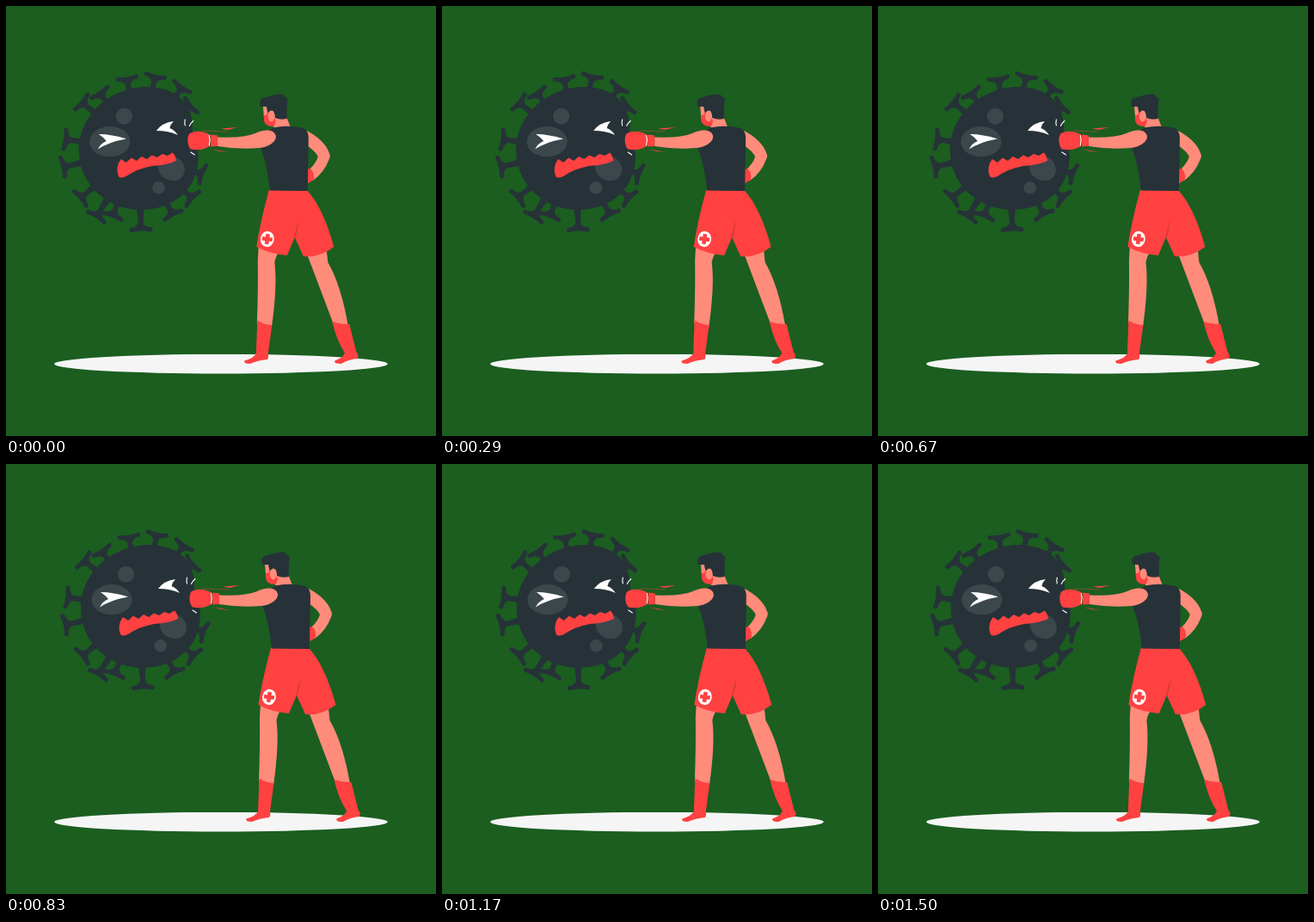
Recreate the animation shown at these times as an HTML page. Size 500 by 500 pixels, loop 1.54 s.

```html
<!DOCTYPE html>
<html lang="en">
<head>
<meta charset="utf-8">
<title>Knockout punch</title>
<style>
  html, body { margin: 0; width: 100%; height: 100%; overflow: hidden; background: #1b5e20; }
  svg { display: block; width: 100%; height: 100%; }
  .dark { fill: #263238; }
  .red { fill: #ff4141; }
  .skin { fill: #ff8b7b; }
  .white { fill: #fff; }
  .spot { fill: #fff; opacity: .1; }
  .line { fill: none; stroke: #fff; stroke-width: 1.1; stroke-linecap: round; }
</style>
</head>
<body>
<svg viewBox="0 0 500 500">
  <defs>
    <path id="spike" d="M-12-2Q0 1 12-2Q15 1 12 3Q4 4 2.800 9L4 24H-4L-2.800 9Q-4 4-12 3Q-15 1-12-2Z"/>
  </defs>
  <ellipse cx="250" cy="416.2" rx="193.9" ry="11.3" fill="#f5f5f5"/>
  <g id="scene">
    <!-- virus -->
    <g id="spikes" class="dark"></g>
    <path class="dark" d="M85 168C85 126 122 94 165 94C204 95 219 119 217 146C233 173 225 237 155 237C116 236 85 206 85 168Z"/>
    <g class="spot">
      <ellipse cx="121" cy="157.700" rx="23.500" ry="17.600"/>
      <circle cx="137.500" cy="128.300" r="9.500"/>
      <ellipse cx="192.500" cy="188.700" rx="16" ry="14" transform="rotate(30 192.500 188.700)"/>
      <circle cx="177.700" cy="211.300" r="7.300"/>
    </g>
    <path class="white" d="M108 149Q123 149 140 154.500Q120 158 107 166.500Q110 160 117 157Q114 153 108 149Z"/>
    <path class="white" d="M175 145Q182 135.500 195 134Q191 138 190.500 142Q196 144 200 150Q189 145 175 145Z"/>
    <path id="mouth" class="red"/>

    <!-- impact and speed lines -->
    <path class="line" d="M208.500 132Q207.500 136 208.500 139M218 133.500Q215 136 213.500 139.500M215 170L219.500 173"/>
    <path class="red" d="M250 142.500L270 141L258 144ZM239 166.500L259 170L248 169Z"/>
    <path class="line" style="stroke: #ff4141; stroke-width: .6; opacity: .7" d="M228 145L257 146"/>

    <!-- far arm -->
    <path class="skin" d="M350 145C362 151 373 161 376 171Q378 174 376 178Q370 194 357 203L351 200L354 189Q361 182 363 175Q360 169 350 162Z"/>
    <path class="red" d="M350 189L355 190Q359 194 358 202L350 207Z"/>

    <!-- legs -->
    <path class="skin" d="M294 278L317 287Q314 291 312.500 298Q316 325 309 374L292 369Q293.500 330 293 295Z"/>
    <path class="red" d="M292.500 365.500Q300 370.500 309.500 371L305 404Q306 409 304 411Q293 412 284 416Q276 416 277.500 412.500Q289 409 291 404Z"/>
    <path class="skin" d="M350 288L373 284L374.500 298Q390 325 398 372L381 370Z"/>
    <path class="red" d="M379.500 367Q390 370.500 399.500 370L407.500 402Q411 406 409 410Q398 411 390 416Q381 416 382.500 412.500Q394 408 394 403Q385 390 379.500 367Z"/>

    <!-- shorts with badge -->
    <path class="red" d="M306 214L351 215Q369 235 381.500 280Q365 293 346 291L336 269L327 290Q306 288 291.500 280Q296 250 306 214Z"/>
    <path fill="#c73a3c" d="M340 249Q338 260 334.500 272L337 268Q340 259 340 249Z"/>
    <g transform="translate(304 271) rotate(8)">
      <ellipse class="white" rx="7.900" ry="9.200"/>
      <path fill="none" stroke="#ff4141" stroke-width="4.600" d="M0-6V6M-6 0H6"/>
    </g>

    <!-- head -->
    <path class="skin" d="M313 128H326L331 141Q320 145 311 141Z"/>
    <path class="skin" d="M299 115H314V136L305 138Q300 134 300 128Z"/>
    <path class="red" d="M300 127Q303 128 305 123H310L314 134L312 139.500Q303 141 300.300 134Z"/>
    <path class="dark" d="M296 117Q293 107 303 106Q312 102 322 102.500Q324 106 328 108Q326 118 327 131Q319 133 313 130L311 122L304.500 124L303 117Z"/>
    <ellipse class="skin" cx="308.800" cy="128" rx="4" ry="6.500"/>

    <!-- shirt, punching arm and glove -->
    <path class="dark" d="M311 141.500Q328 138 346 142Q352 145 352 153L351 215L307 214.500Q304 183 295.500 163Q300 148 311 141.500Z"/>
    <path class="skin" d="M246 152.500Q276 154 290 148C300 143 312 143 314 151C315 158 305 164 295 165Q270 167 246 163Z"/>
    <path class="red" d="M237 149.500Q224 143 214 148C210 152 211 163 215 166.500Q227 169 237 163Z"/>
    <path class="red" d="M238 149.500L246 150.500V163L238 163.500Z"/>
    <path class="line" d="M236.500 150.500Q238 156 236.500 162"/>
  </g>
</svg>
<script>
const byId = id => document.getElementById(id);

// Direction in degrees clockwise from the top, and distance of the cap from the centre.
const spikes = [
  [-9, 85], [13, 89], [35, 90], [50, 81], [111, 81], [132, 86], [152, 87], [178, 94],
  [201, 84], [212, 93], [230, 89], [257, 91], [278, 87], [310, 87], [326, 81]
];
byId('spikes').innerHTML = spikes.map(([angle, reach]) =>
  `<use href="#spike" transform="translate(154 167) rotate(${angle}) translate(0 ${-reach})"/>`
).join('');

let teeth = '';
for (let i = 0; i <= 10; i++) {
  teeth += `L${134 + 6 * i} ${i % 2 ? 183 - i : 178 - .75 * i}`;
}
byId('mouth').setAttribute('d',
  `M131 198Q127 187 134 178${teeth}Q198 175 198 180Q188 185 170 186Q153 189 140 198Q133 201 131 198Z`);

const LOOP = 1540, FRAME = 1000 / 24, LAST = 36, PHASE = 29;
const swing = [0, -1, 2, -4, 4, -4]; // first half of the shake, then mirrored
const key = i => swing[Math.min(i, 10 - i)];

function offsetAt(ms) {
  const pos = ms % 1500 / 150, i = Math.floor(pos);
  return key(i) + (key(i + 1) - key(i)) * (pos - i);
}

const start = performance.now();
function draw(now) {
  const t = Math.max(0, now - start) % LOOP;
  const frame = Math.min(LAST, Math.floor((t + 5) / FRAME));
  byId('scene').setAttribute('transform', `translate(${offsetAt(frame * FRAME + PHASE)} 0)`);
  requestAnimationFrame(draw);
}
draw(start);
</script>
</body>
</html>
```
